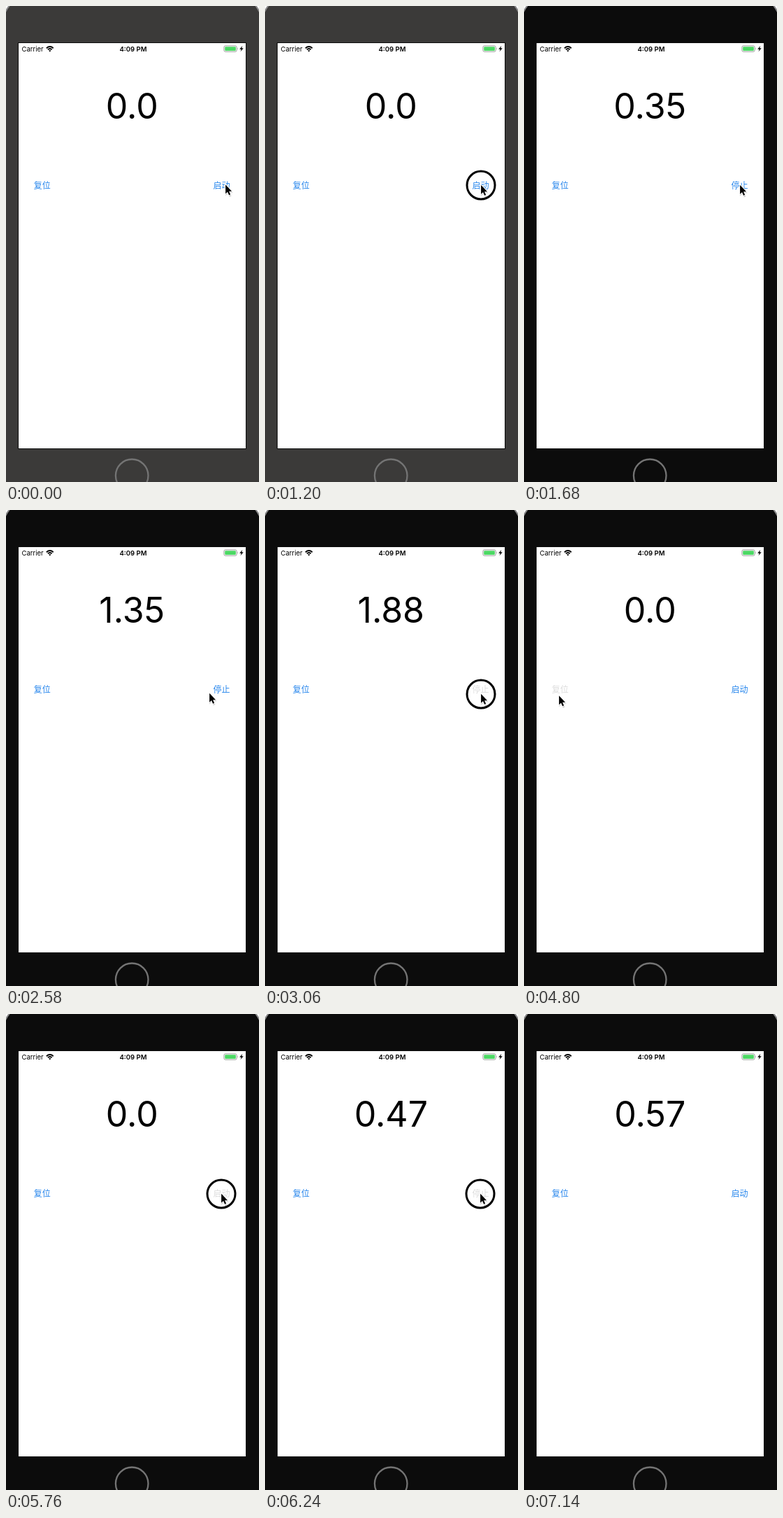
Write an HTML page that moves like this. It is 362 px wide and 680 px high and loops after 7200 ms.

```html
<!DOCTYPE html>
<html lang="zh-CN">
<head>
<meta charset="utf-8">
<title>Stopwatch</title>
<style>
  html, body { margin: 0; width: 362px; height: 680px; overflow: hidden; background: #fff; }
  svg { display: block; font-family: Inter, "Liberation Sans", sans-serif; }
  .button { font: 500 12px "Noto Sans CJK SC", "Noto Sans CJK", sans-serif; }
</style>
</head>
<body>
<svg width="362" height="680" viewBox="0 0 362 680">
  <rect id="bezel" width="362" height="680"/>
  <g fill="#fff" stroke="#8c8c8c" stroke-width="2">
    <path d="M-2 11Q1 4 6-2H-2Z"/>
    <path d="M364 11Q361 4 356-2H364Z"/>
  </g>
  <rect x="17.5" y="52.5" width="326" height="580" fill="#fff" stroke="#0c0c0c"/>
  <rect x="18" y="53" width="325" height="579" fill="#fff"/>
  <circle cx="180.2" cy="670.8" r="23.3" fill="none" stroke="#747474" stroke-width="2.3"/>

  <text x="22.5" y="64.7" font-size="9.5">Carrier</text>
  <text x="182" y="64.7" font-size="9.5" font-weight="600" text-anchor="middle">4:09 PM</text>
  <g fill="none" stroke="#000" stroke-width="1.9">
    <path d="M57.9 60.2Q62.8 55.8 67.7 60.2"/>
    <path d="M59.9 62.3Q62.8 59.8 65.7 62.3"/>
  </g>
  <path d="M61.2 63.7Q62.8 62.4 64.4 63.7L62.8 65.4Z"/>
  <rect x="311.9" y="56.9" width="18.2" height="8.4" rx="2" fill="#fff" stroke="#929292" stroke-width=".9"/>
  <rect x="313.2" y="58.2" width="15.6" height="5.8" rx="1" fill="#4cd964"/>
  <path d="M331.2 59.6q1.3 1.5 0 3z" fill="#929292"/>
  <path d="M338.3 56.8L334.2 61.7H336.7L335.5 65.3L339.7 60.2H337.2Z"/>

  <text id="count" x="180.3" y="161" font-size="50" text-anchor="middle">0.0</text>
  <text id="reset" class="button" x="39.8" y="261">复位</text>
  <text id="toggle" class="button" x="296.5" y="261">启动</text>

  <circle id="ring" r="20" fill="none" stroke="#000" stroke-width="3"/>
  <g id="cursor">
    <path d="M.3 2V17L4 14L6.3 18.8L9 17.5L6.9 12.8H11.3Z" fill="#000" opacity=".18"/>
    <path d="M.6 1.2V14.2L3.5 11.5L5.6 16.2L7.6 15.2L5.6 10.7H9.6Z" stroke="#fff" stroke-width="2" paint-order="stroke"/>
  </g>
</svg>
<script>
const LOOP = 7200, STEP = 60;
const [bezel, count, reset, toggle, ring, cursor] =
  ['bezel', 'count', 'reset', 'toggle', 'ring', 'cursor'].map(id => document.getElementById(id));

// time, x, y of the pointer tip
const path = [
  [0, 313.5, 254], [240, 312, 247], [540, 300, 239], [840, 305, 249], [1080, 308.5, 254.5],
  [1680, 308.5, 254.5], [2160, 298, 263], [2580, 290.5, 260.5], [2880, 308.5, 261.5],
  [3960, 308.5, 261.5], [4500, 49.5, 264], [4860, 49.5, 264], [5340, 326, 262],
  [5580, 307.5, 255.5], [6420, 307.5, 255.5], [6960, 330, 690]
];

// button, pointer down, pointer up
const presses = [
  [toggle, 1200, 1380], [toggle, 3000, 3180], [reset, 4560, 4800],
  [toggle, 5640, 5820], [toggle, 6180, 6330]
];

const runs = [
  { from: 1365, show: 1380, stop: 3180, clear: 4800 },
  { from: 5817, show: 5820, stop: 6330, clear: LOOP }
];

const clamp = v => Math.max(0, Math.min(1, v));

function pointAt(t) {
  const next = path.findIndex(p => p[0] > t);
  if (next < 0) return path[path.length - 1].slice(1);
  const [a, b] = [path[next - 1], path[next]];
  const u = (t - a[0]) / (b[0] - a[0]);
  const e = u * u * (3 - 2 * u);
  return [a[1] + (b[1] - a[1]) * e, a[2] + (b[2] - a[2]) * e];
}

// Grey while held, then back to blue after release
function tintOf(button, t) {
  const press = presses.filter(p => p[0] === button && t >= p[1]).pop();
  const blue = !press || t < press[1] + STEP ? 1 : clamp((t - press[2]) / 240);
  return `color-mix(in srgb, #2585ec ${blue * 100}%, #dcdcdc)`;
}

function draw(t) {
  const run = runs.find(r => t >= r.show && t < r.clear);
  const hundredths = run && Math.floor((Math.min(t, run.stop) - run.from) / 9 + 1e-6);
  count.textContent = run ? (hundredths / 100).toFixed(2) : '0.0';
  toggle.textContent = run && t < run.stop ? '停止' : '启动';
  for (const button of [reset, toggle]) button.style.fill = tintOf(button, t);

  const [x, y] = pointAt(t);
  cursor.setAttribute('transform', `translate(${x} ${y})`);
  ring.setAttribute('transform', `translate(${x + 0.5} ${y + 1.5})`);
  ring.setAttribute('visibility', presses.some(p => t >= p[1] && t < p[2]) ? 'visible' : 'hidden');
  bezel.setAttribute('fill', t < 1380 ? '#3b3a39' : '#0c0c0c');
}

const start = performance.now();
function tick() {
  const t = (performance.now() - start) % LOOP;
  draw(Math.floor(t / STEP) * STEP);
  requestAnimationFrame(tick);
}
tick();
</script>
</body>
</html>
```
